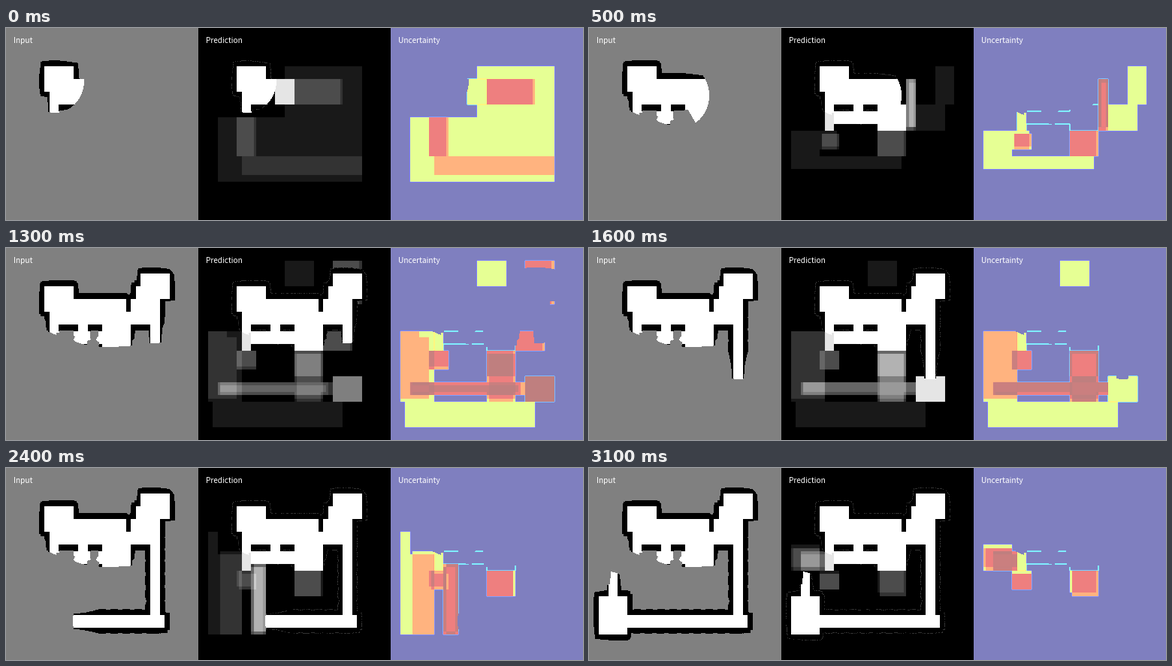
Recreate the animation shown at these times as a matplotlib script. Size 768 by 256 pixels, loop 3200 ms.

```python
import numpy as np
import matplotlib.pyplot as plt
from matplotlib.animation import FuncAnimation

N, FRAMES, VOTERS = 256, 32, 10
CW, CH = N / 20, N / 15          # one map cell in pixels
RX, RY = 39, 43                  # sensor range
DEPTH = 0.18                     # how far a ray enters a wall, in ranges
RAYS = 1440
yy, xx = np.mgrid[0:N, 0:N] + 0.5


def fill(img, c0, r0, c1, r1, v=1):
    img[round(r0 * CH):round(r1 * CH), round(c0 * CW):round(c1 * CW)] = v


# --- true map: rooms, doors and corridors in cells ---------------------------
floor = np.zeros((N, N), bool)
for room in [(4, 3, 7, 5), (7, 4, 12.5, 6), (4.5, 5, 13, 6), (13, 4, 16, 6),
             (13.5, 3, 14, 4), (14, 2, 17, 4), (4.5, 6, 5.5, 8),
             (7.5, 6, 8.5, 6.5), (5.5, 6.5, 10, 7.5), (10, 6, 13, 8),
             (15, 6, 16, 12.5), (4, 11.5, 16.5, 12.5), (1, 10, 4, 13),
             (2, 7, 3, 10)]:
    fill(floor, *room)

# --- sensor walk: frame, x, y ------------------------------------------------
walk = np.array([(0, 65, 70), (5, 121, 90), (9, 168, 88), (11.3, 196, 57),
                 (16, 199, 132), (20, 192, 204), (24, 128, 204),
                 (29.6, 38, 204), (31, 25, 181)])


def scan(x, y):
    """Pixels in range whose line of sight ends at most DEPTH inside a wall."""
    angle = np.linspace(-np.pi, np.pi, RAYS, endpoint=False)[:, None]
    r = np.linspace(0, 1, 150)
    px = np.clip(x + RX * r * np.cos(angle), 0, N - 1).astype(int)
    py = np.clip(y + RY * r * np.sin(angle), 0, N - 1).astype(int)
    wall = ~floor[py, px]
    hit = np.where(wall.any(1), r[wall.argmax(1)], 1)
    reach = np.minimum(hit + DEPTH, 1)
    dx, dy = (xx - x) / RX, (yy - y) / RY
    ray = ((np.arctan2(dy, dx) + np.pi) * RAYS / (2 * np.pi)).astype(int) % RAYS
    return np.hypot(dx, dy) <= reach[ray]


def explore():
    seen, maps = np.zeros((N, N), bool), []
    for f in range(FRAMES):
        x, y = (np.interp(f, walk[:, 0], walk[:, k]) for k in (1, 2))
        seen = seen | scan(x, y)
        maps.append(seen)
    return maps


# --- ensemble: guessed rooms with the number of voters that believe in them ---
common = [(4.5, 6, 5.5, 8, 9), (5.5, 6.5, 10, 7.5, 10), (10, 6, 13, 8, 10),
          (10, 8, 13, 10, 3), (4, 8, 6, 9.5, 3)]
stages = {
    0: [(9, 3, 17, 12, 1), (2, 7, 9, 12, 1), (4.5, 10, 17, 11.5, 1),
        (8, 4, 10, 6, 9), (10, 4, 15, 6, 3), (4, 7, 6, 10, 3)],
    5: [(1, 8, 4, 11, 1), (4, 10, 12.5, 11, 1), (13, 4, 14, 8, 7),
        (16, 3, 18, 6, 1), (14, 6, 17, 8, 1)],
    9: [(1, 5, 3, 8, 1), (1, 7, 4, 12, 2), (2, 10.5, 13.5, 11.5, 3),
        (13, 6.5, 16, 8, 8), (14, 1, 17, 4.4, 8)],
    16: [(9, 1, 12, 3, 1), (1, 6.5, 4.5, 12, 2), (1.5, 12, 15, 14, 1),
         (2, 10.5, 14, 11.5, 4), (10, 8, 13, 12, 5), (14, 10, 17, 12, 9)],
    20: [(1, 8, 4, 12, 1), (3, 11.5, 9, 12.5, 1), (10, 8, 13, 13, 9)],
    24: [(1, 5, 2, 13, 1), (2, 6.5, 4.5, 13, 2), (5.5, 7.5, 7, 13, 7)],
    31: [(1, 6, 4, 8, 3), (2, 6.5, 4.5, 8, 4)],
}


def poll(frame):
    """Share of voters per pixel; each voter trims its rooms a little."""
    rng = np.random.default_rng(frame)
    ballots = np.zeros((VOTERS, N, N))
    for *box, votes in stages[frame] + (common if frame else []):
        slack = 0.25 if 1 < votes < 9 else 0
        for k in rng.permutation(VOTERS)[:votes]:
            trim = slack * (rng.random(4) < 0.25)
            fill(ballots[k], *(box + trim * (1, 1, -1, -1)))
    return ballots.mean(0)


def soften(a, k=0.03):
    for axis in (0, 1):
        a = (1 - 2 * k) * a + k * (np.roll(a, 1, axis) + np.roll(a, -1, axis))
    return a


keys = sorted(stages)
polls = {k: poll(k) for k in keys}
known_maps = explore()
speckle = np.random.default_rng(4).random((N, N)) > 0.45
jet = plt.get_cmap("jet")


def belief(frame):
    a = max(k for k in keys if k <= frame)
    b = min(k for k in keys if k >= frame)
    s = (frame - a) / max(b - a, 1)
    p = (1 - s) * polls[a] + s * polls[b]
    return np.clip(soften(np.round(p * VOTERS) / VOTERS), 0, 1)


def rim(mask):
    core = mask.copy()
    for axis in (0, 1):
        for d in (1, -1):
            core &= np.roll(mask, d, axis)
    return mask & ~core


def compose(frame):
    known = known_maps[frame]
    view = np.where(known, floor, 128 / 255)
    p = np.where(known, floor, belief(frame))
    heat = 0.5 + 0.5 * jet(2 * np.sqrt(p * (1 - p)))[..., :3]
    shown = np.where(rim(known) & speckle & ~floor, 0.2, p)
    gray = np.repeat(np.hstack([view, shown])[..., None], 3, axis=2)
    return np.hstack([gray, heat])


fig = plt.figure(figsize=(7.68, 2.56), dpi=100)
ax = fig.add_axes([0, 0, 1, 1])
ax.axis("off")
picture = ax.imshow(compose(0), extent=(0, 3 * N, N, 0),
                    interpolation="nearest", aspect="auto")
for i, label in enumerate(("Input", "Prediction", "Uncertainty")):
    ax.text(10 + i * N, 20, label, color="white", family="Noto Sans CJK JP",
            size=7.3, va="baseline")
ax.set_xlim(0, 3 * N)
ax.set_ylim(N, 0)


def update(frame):
    picture.set_data(compose(frame))
    return [picture]


anim = FuncAnimation(fig, update, frames=FRAMES, interval=100, repeat=True)
plt.show()
```
